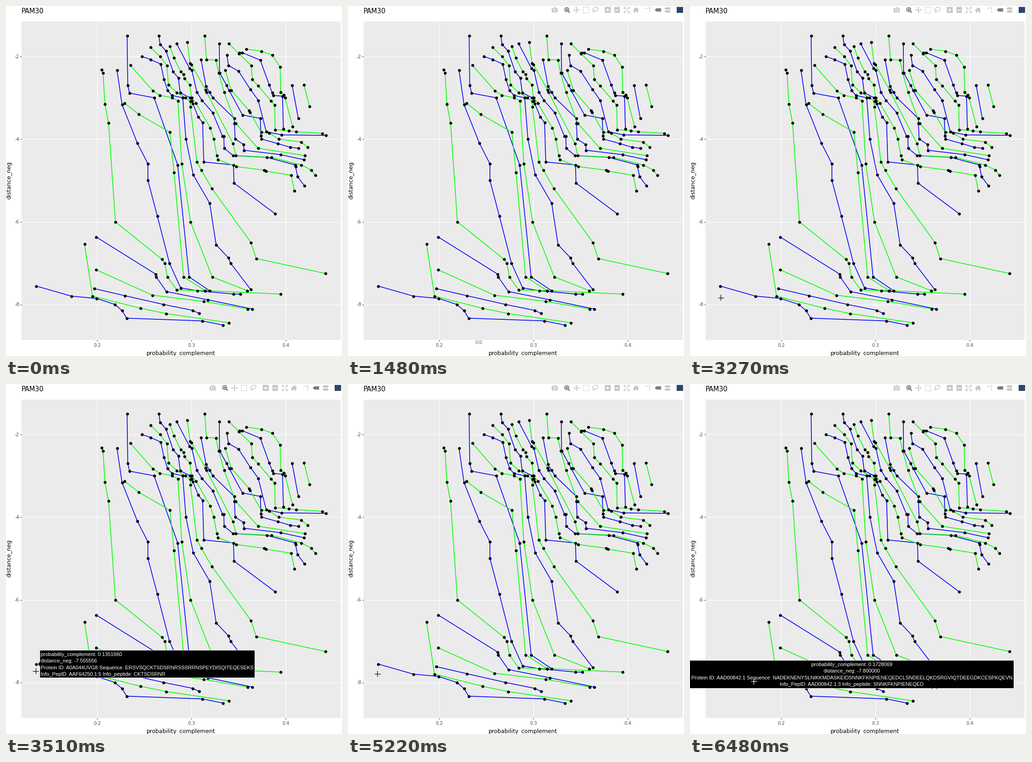
Animation of 734x763 px, one loop 8000 ms. Source, as a matplotlib script:

```python
import numpy as np
import matplotlib.pyplot as plt
from matplotlib.animation import FuncAnimation
from matplotlib.collections import LineCollection
from matplotlib.patches import Circle, Ellipse, Polygon, Rectangle

W, H, DPI = 734, 763, 100
LOOP, STEP = 8000, 40
PX = 72 / DPI
SANS, ARIAL = "DejaVu Sans", "Liberation Sans"
BLUE, GREEN = "#0000ff", "#00ff00"
LIGHT, DARK = "#c7c7c7", "#7c7c7c"

fig = plt.figure(figsize=(W / DPI, H / DPI), dpi=DPI, facecolor="white")
ax = fig.add_axes([0, 0, 1, 1])
ax.set_xlim(0, W)
ax.set_ylim(H, 0)
ax.axis("off")


def text(x, y, s, size, color="black", font=SANS, **kw):
    return ax.text(x, y, s, fontsize=size * PX, color=color, family=font,
                   va="baseline", **kw)


def box(x0, y0, x1, y1, color, z=1, **kw):
    return ax.add_patch(Rectangle((x0, y0), x1 - x0, y1 - y0, fc=color,
                                  ec="none", zorder=z, **kw))


def line(xs, ys, color, width=1, z=1, **kw):
    kw.setdefault("solid_capstyle", "butt")
    return ax.plot(xs, ys, color=color, lw=width * PX, zorder=z, **kw)[0]


def poly(color, *pts):
    ax.add_patch(Polygon(pts, fc=color, ec="none"))


# ---- panel, grid and axes ----
box(34, 33.5, 730.5, 727.5, "#ebebeb", 0)
for x, label in zip((199.3, 405.3, 611.3), ("0.2", "0.3", "0.4")):
    line([x, x], [33.5, 727.5], "white", 1.1)
    line([x, x], [727.5, 731], "#333333", 1.1)
    text(x, 743, label, 9.95, "#4d4d4d", ha="center")
for y, label in zip((110, 290.2, 470.5, 650.8), ("-2", "-4", "-6", "-8")):
    line([34, 730.5], [y, y], "white", 1.1)
    line([30.5, 34], [y, y], "#333333", 1.1)
    text(29, y + 3.6, label, 9.95, "#4d4d4d", ha="right")
text(34, 16, "PAM30", 14.6)
text(382.5, 761, "probability_complement", 12.44, ha="center")
text(10.5, 380, "distance_neg", 12.44, ha="center", rotation=90,
     rotation_mode="anchor")

# ---- nested fronts ----
paths, colors = [], []


def front(color, *xy):
    paths.append(np.reshape(xy, (-1, 2)))
    colors.append(color)


front(BLUE, 66, 610.5, 143, 632.5, 197.5, 637.5, 237.5, 650.5, 253.5, 664,
      263.5, 680.5, 429, 686.5, 473.5, 695.5)
front(BLUE, 192.5, 616, 259.5, 631.5, 343.5, 650.5, 408, 663.5, 421.5, 670)
front(BLUE, 197, 503.5, 327, 584.5, 328, 590.5, 350.5, 622.5, 441, 640.5,
      538, 660.5)
front(BLUE, 242.5, 140, 253.5, 215, 287, 299, 310, 344, 310, 380,
      330.5, 457.5, 357, 560.5, 381.5, 614.5, 417.5, 620.5, 497, 628,
      511.5, 628)
front(BLUE, 264.5, 65, 266, 173, 270, 190, 323.5, 200, 375, 346.5,
      400, 590.5, 444.5, 620.5)
front(BLUE, 297, 110, 315.5, 116.5, 338, 126.5, 345, 159.5, 353, 184,
      362.5, 195, 386, 200, 393, 290, 409, 368, 445, 430, 459, 520.5,
      485.5, 548.5, 490.5, 560.5, 534.5, 618)
front(BLUE, 334, 65, 336.5, 83.5, 349.5, 98, 365, 143, 376.5, 157,
      380.5, 189, 402, 200, 406, 206.5, 408, 212.5, 420, 242, 429.5, 254,
      432, 340, 497, 346.5, 498, 386, 587.5, 452.5)
front(BLUE, 372.5, 81.5, 401, 136, 406, 140, 417, 188, 428, 205.5,
      451.5, 232.5, 473, 284, 476, 284, 476.5, 310, 496, 326, 570, 330,
      632, 346.5, 632.5, 350, 637, 372, 651.5, 391.5)
front(BLUE, 426, 116.5, 437, 175, 444.5, 188, 452, 200, 498.5, 245,
      499, 255.5, 500.5, 290, 519, 302, 520, 314.5, 599.5, 324, 650.5, 335)
front(BLUE, 466, 82, 466.5, 145.5, 482, 173, 487.5, 184, 516.5, 237.5,
      555.5, 245, 557, 282.5, 558, 290, 594, 300, 621, 308, 638.5, 310)
front(BLUE, 482.5, 107, 486, 129.5, 508, 142, 534, 182, 551, 205.5,
      568.5, 274, 602, 281, 699, 282)
front(BLUE, 509.5, 101.5, 515.5, 101.5, 555.5, 118, 575, 172, 581.5, 189,
      584, 195, 604, 196.5, 606, 268)
front(BLUE, 625, 172.5, 638.5, 245)

front(GREEN, 171.5, 518.5, 189, 632.5, 294, 659, 350, 670.5, 486.5, 690.5)
front(GREEN, 197, 575, 320, 630.5, 432, 644, 528, 660.5)
front(GREEN, 209, 139, 212, 146, 216, 214, 224, 255, 239, 470.5,
      340.5, 552, 347, 560.5, 352.5, 590.5, 373, 619, 435, 620.5,
      599.5, 628)
front(GREEN, 258.5, 211.5, 290, 236, 358, 275, 367, 362.5, 388, 590.5,
      435, 620.5)
front(GREEN, 271.5, 129, 321, 185, 336, 194.5, 363, 200, 375.5, 206.5,
      384, 344, 403, 470.5, 450.5, 590.5, 527, 620.5)
front(GREEN, 315.5, 90, 336.5, 110, 351.5, 130, 355, 172, 373, 188.5,
      392, 200, 402.5, 208, 403, 220, 417, 340, 426.5, 357.5, 450, 398,
      535, 515.5, 546.5, 550.5, 697.5, 583)
front(GREEN, 358, 88, 366.5, 112.5, 381.5, 142.5, 387.5, 149, 389.5, 158,
      401.5, 172, 405.5, 200, 415, 212, 446, 265.5, 454, 290, 460.5, 326,
      463, 335, 503, 350, 564, 358, 568, 360, 623, 369, 630, 403)
front(GREEN, 396, 79, 402, 124.5, 405, 127.5, 436, 183, 438, 188,
      496, 300, 502, 326, 580, 330, 645, 346.5, 667, 357.5, 675.5, 369)
front(GREEN, 434, 65, 438, 116.5, 458.5, 118, 464.5, 146, 476.5, 188,
      501.5, 255.5, 550.5, 310, 652.5, 326)
front(GREEN, 479, 140, 492, 183.5, 531, 228, 533, 232, 557.5, 275,
      574.5, 276.5, 595.5, 290, 645, 296.5, 659, 308)
front(GREEN, 487, 82, 508.5, 103.5, 536, 130, 538, 160, 551, 174,
      579, 207, 587, 216, 588, 269.5, 618, 272, 634, 274, 691, 277.5)
front(GREEN, 524.5, 94, 558, 98.5, 581.5, 107, 599, 133, 600, 188,
      606.5, 194, 609.5, 200, 626, 262.5)
front(GREEN, 651, 172, 663, 219)

ax.add_collection(LineCollection(paths, colors=colors, linewidths=1.65 * PX,
                                 zorder=2), autolim=False)
dots = np.vstack(paths)
ax.plot(dots[:, 0], dots[:, 1], "o", color="black", ms=6.4 * PX, mew=0,
        zorder=3)


# ---- toolbar icons ----
def ring(x, y, r, color, width):
    ax.add_patch(Circle((x, y), r, fc="none", ec=color, lw=width * PX))


def disc(x, y, r, color):
    ax.add_patch(Circle((x, y), r, fc=color, ec="none"))


def tag(x, y, w, h, color):
    poly(color, (x, y), (x + 4, y - h), (x + w, y - h), (x + w, y + h),
         (x + 4, y + h))


box(445, 4.5, 458, 13.8, LIGHT)
box(448.5, 3, 454.5, 5, LIGHT)
disc(451.5, 9, 3.2, "white")
disc(451.5, 9, 1.9, LIGHT)

ring(477.8, 7.8, 4.4, DARK, 2)
box(475.8, 5.8, 479.8, 9.8, DARK)
line([481, 484.5], [11, 14.5], DARK, 2.5)

line([494, 504], [8.5, 8.5], LIGHT, 1.6)
line([499, 499], [3.5, 13.5], LIGHT, 1.6)
for dx, dy in ((1, 0), (-1, 0), (0, 1), (0, -1)):
    cx, cy = 499 + 4 * dx, 8.5 + 4 * dy
    poly(LIGHT, (cx + 3 * dx, cy + 3 * dy), (cx + 2.6 * dy, cy + 2.6 * dx),
         (cx - 2.6 * dy, cy - 2.6 * dx))

line([513.7, 525.7, 525.7, 513.7, 513.7], [2.7, 2.7, 14.7, 14.7, 2.7],
     LIGHT, 1.5, dashes=(1.4, 1.2))

ax.add_patch(Ellipse((540.5, 7), 12, 8, angle=-20, fc="none", ec=LIGHT,
                     lw=1.5 * PX))
line([536, 535, 537, 537.5], [9.5, 11.5, 12.5, 15], LIGHT, 1.5)

for x in (567.3, 588):
    box(x - 6.2, 2.4, x + 6.2, 14.8, LIGHT)
    line([x - 3.6, x + 3.6], [8.6, 8.6], "white", 1.8)
line([567.3, 567.3], [5, 12.2], "white", 1.8)

for dx in (-1, 1):
    for dy in (-1, 1):
        cx, cy = 608.5 + 6 * dx, 8.6 + 6 * dy
        line([cx - 3.5 * dx, cx, cx], [cy, cy, cy - 3.5 * dy], LIGHT, 1.5)
        line([608.5 + 1.5 * dx, cx - 2 * dx], [8.6 + 1.5 * dy, cy - 2 * dy],
             LIGHT, 2)

poly(LIGHT, (622.3, 9.2), (629, 2.8), (635.7, 9.2))
box(624.3, 9, 633.5, 14.4, LIGHT)
box(632, 3.5, 633.6, 7, LIGHT)
box(627.8, 10.5, 630.2, 14.4, "white")

line([649, 656], [4.5, 4.5], LIGHT, 1.6, dashes=(1.6, 0.8))
line([659, 659], [7.5, 14.5], LIGHT, 1.6, dashes=(1.6, 0.8))
disc(659, 4.5, 1.6, LIGHT)

tag(670, 8.6, 14, 3.6, DARK)
tag(690.5, 5.2, 13.5, 2.5, LIGHT)
tag(690.5, 12, 13.5, 2.5, LIGHT)
box(718.3, 2, 731.5, 15.2, "#2a4570")

veil = box(440, 0, W, 20, "white", 5)


# ---- hover labels ----
def hover(point, outline, x, base, align, rows):
    shape = ax.add_patch(Polygon(outline, fc="black", ec="white",
                                 lw=0.85 * PX, zorder=6))
    parts = [shape]
    for i, row in enumerate(rows):
        parts.append(text(x, base + 14.4 * i, row, 11.1, "white", ARIAL,
                          ha=align, zorder=7))
    return point, parts


hovers = [
    hover((66, 610.5),
          [(69, 610.5), (74, 605), (74, 580.3), (543.7, 580.3),
           (543.7, 640.5), (74, 640.5), (74, 616)],
          76, 593, "left",
          ["probability_complement: 0.1351660",
           "distance_neg: -7.555556",
           "Protein ID: A0A044UVG8 Sequence: "
           "ERSVSQCKTSDSRNRSSSRRNSPEYDISQITEQESEKS",
           "Info_PepID: AAF64250.1:5 Info_peptide: CKTSDSRNR"]),
    hover((143, 632.5),
          [(-1, 602.3), (707.2, 602.3), (707.2, 662.5), (-1, 662.5)],
          353.5, 615, "center",
          ["probability_complement: 0.1728069",
           "distance_neg: -7.800000",
           "Protein ID: AAD00842.1 Sequence: "
           "NADEKNENYSLNIKKMDASKEIDSNNKFKNPIENEQEDCLSNDEELQKDSRGVIQ"
           "TDEEGDKCESPKQEVN",
           "Info_PepID: AAD00842.1:3 Info_peptide: SNNKFKNPIENEQED"]),
]

# ---- pointer ----
arms = [line([], [], "black", 1.2, 9) for _ in range(2)]
RESIZE = np.array([(-7.5, 0), (-3.5, -4), (-3.5, -1.6), (3.5, -1.6),
                   (3.5, -4), (7.5, 0), (3.5, 4), (3.5, 1.6), (-3.5, 1.6),
                   (-3.5, 4)])
resize = ax.add_patch(Polygon(RESIZE, fc="white", ec="#777777", lw=0.9 * PX,
                              zorder=9))

KEY_T = [530, 1310, 1400, 1480, 2170, 2230, 2560, 3030, 3120, 3510, 4920,
         5220, 5700, 5770, 6250, 6480]
KEY_X = [560, 347, 347, 285.5, 115.5, 115.5, 78, 68.5, 68.5, 64.7, 64.7,
         64.3, 94, 94, 133.3, 139]
KEY_Y = [770, 733, 733, 733, 691, 691, 662.5, 640.5, 640.5, 624.7, 624.7,
         632, 646, 646, 648.3, 648]
REACH = 17


def update(i):
    t = i * STEP
    x, y = np.interp(t, KEY_T, KEY_X), np.interp(t, KEY_T, KEY_Y)
    veil.set_alpha(1 - np.clip((t - 490) / 300, 0, 1))

    near = [np.hypot(x - p[0], y - p[1]) < REACH for p, _ in hovers]
    for (_, parts), show in zip(hovers, near):
        for part in parts:
            part.set_visible(bool(show))

    on_plot = y < 727.5
    resize.set_visible(bool(t >= 530 and not on_plot and y < 748))
    resize.set_xy(RESIZE + (x, y))
    arms[0].set_data([x - 6.5, x + 6.5], [y, y])
    arms[1].set_data([x, x], [y - 6.5, y + 6.5])
    for arm in arms:
        arm.set_visible(bool(on_plot))
        arm.set_color("white" if near[1] else "black")
    return []


anim = FuncAnimation(fig, update, frames=LOOP // STEP, interval=STEP,
                     init_func=lambda: update(0), repeat=True, repeat_delay=0)
plt.show()
```
